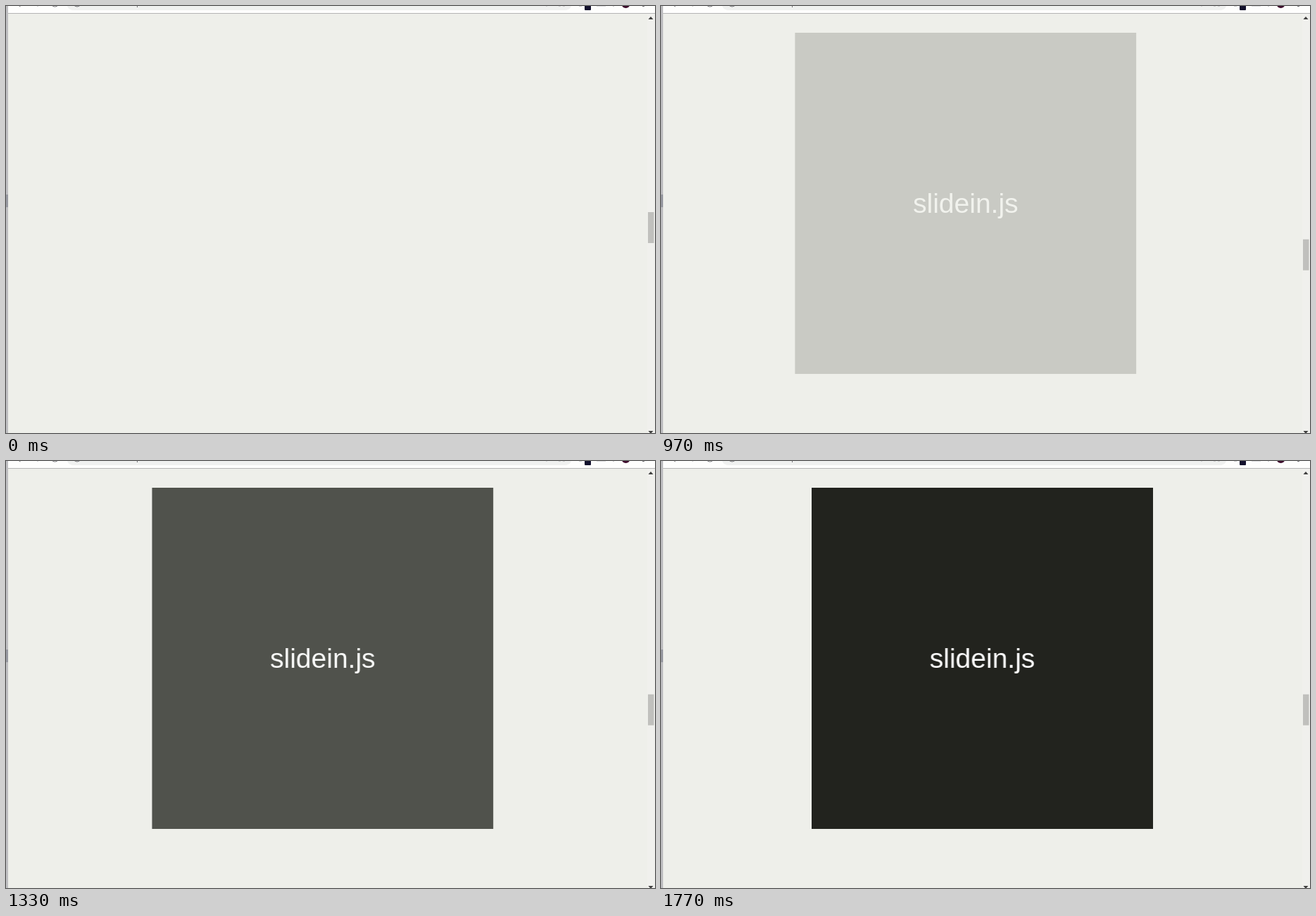
Recreate the animation shown at these times as an HTML page. Size 922 by 607 pixels, loop 2060 ms.

```html
<!DOCTYPE html>
<html lang="en">
<head>
<meta charset="utf-8">
<title>Slide in on scroll</title>
<style>
  html, body { margin: 0; width: 100%; height: 100%; overflow: hidden; background: #eeefea; }
  #stage { position: absolute; left: 0; top: 0; width: 922px; height: 607px; overflow: hidden; background: #eeefea; }
  #chrome { position: absolute; left: 0; top: 0; }
  #box {
    position: absolute; left: 214px; top: 38px; width: 485px; height: 485px;
    display: flex; align-items: center; justify-content: center;
    background: #22231e; color: #fff; opacity: 0; will-change: transform, opacity;
    font: 39px "Liberation Sans", Arial, sans-serif;
  }
</style>
</head>
<body>
<div id="stage">
  <svg id="chrome" width="922" height="607" viewBox="0 0 922 607">
    <!-- toolbar -->
    <rect width="922" height="10" fill="#fefefd"/>
    <path d="M87 0H803Q801 6 793 6H97Q89 6 87 0Z" fill="#f0f1f0"/>
    <rect y="10" width="922" height="1" fill="#b4b4b4"/>
    <g fill="none" stroke="#77777a" stroke-width="1">
      <path d="M18.500 0l2 .8M66 0q3.500 2.200 7 0M97.500 0q3.500 2 7 0M186.500 0v2"/>
      <path d="M44 .3h2M767 .3h2M785 .5h3M791 .5h3M814 .5h4M862 .5h2" stroke="#cfcfd0"/>
      <path d="M904 .5h3"/>
    </g>
    <rect x="822" y="-3" width="9" height="9" rx="1" fill="#12102c"/>
    <rect x="839" y="-3" width="13" height="4" fill="#dededf"/>
    <circle cx="880.5" cy="-3" r="6" fill="#3c0b2b"/>
    <!-- window edge -->
    <rect width="3" height="607" fill="#bebec1"/>
    <rect y="268" width="3" height="18" fill="#9799a1"/>
    <!-- scrollbar -->
    <rect x="911" y="11" width="11" height="596" fill="#f0f0ed"/>
    <path d="M912.500 19L916 15L919.500 19ZM912.500 604L916 608L919.500 604Z" fill="#3f3f3f"/>
    <rect id="thumb" x="912" y="293" width="8.500" height="44" fill="#c0c0bd"/>
  </svg>
  <div id="box">slidein.js</div>
</div>
<script>
  const LOOP = 2060, SHOW = 970;
  const box = document.getElementById('box');
  const thumb = document.getElementById('thumb');

  // moments at which the screen refreshes
  const ticks = [0, 770, 800, 840, 880, 930, 970, 1030, 1070, 1130, 1170, 1200, 1230, 1270,
    1300, 1330, 1370, 1410, 1450, 1490, 1530, 1570, 1630, 1670, 1720, 1770];

  const progress = (t, start, length) => Math.min(1, Math.max(0, (t - start) / length));
  const easeOut = u => 1 - (1 - u) ** 2;
  const easeInOut = u => u * u * (3 - 2 * u);

  function draw(now) {
    const t = now % LOOP;
    const held = ticks.findLast(tick => tick <= t);
    const scroll = easeInOut(progress(held, 732, 180));
    const slide = easeOut(progress(held, 889, 838));

    thumb.setAttribute('y', 293 + 38.7 * scroll);
    box.style.opacity = held < SHOW ? 0 : slide;
    box.style.transform = `translateX(${-29 * (1 - slide)}px)`;
  }

  const begin = performance.now();
  function loop() {
    draw(performance.now() - begin);
    requestAnimationFrame(loop);
  }
  loop();
</script>
</body>
</html>
```
